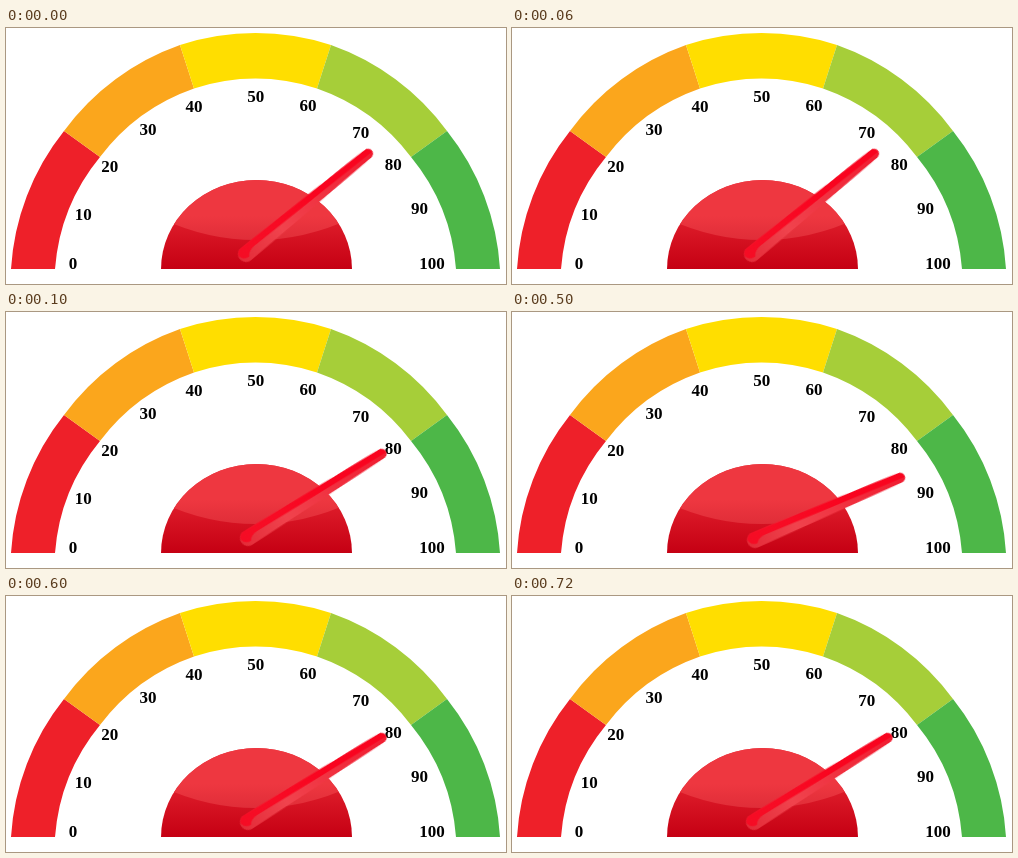
Recreate the animation shown at these times as an HTML page. Size 500 by 256 pixels, loop 800 ms.

```html
<!DOCTYPE html>
<html lang="en">
<head>
<meta charset="utf-8">
<title>Gauge</title>
<style>
html, body { margin: 0; width: 100%; height: 100%; overflow: hidden; background: #fff; }
svg { display: block; width: 500px; height: 256px; }
text { font: bold 17px "Liberation Serif", serif; text-anchor: middle; fill: #000; }
.needle { animation: swing 800ms step-end infinite; }
@keyframes swing {
  0%, 100% { transform: translate(240px, 226px) rotate(-39.4deg); }
  12.5%, 75% { transform: translate(242px, 226px) rotate(-32.2deg); }
  62.5% { transform: translate(243px, 228px) rotate(-23.2deg); }
}
</style>
</head>
<body>
<svg viewBox="0 0 500 256">
  <defs>
    <linearGradient id="body" x2="0" y2="1">
      <stop offset="0" stop-color="#e9303a"/>
      <stop offset=".5" stop-color="#dc1a28"/>
      <stop offset="1" stop-color="#c50013"/>
    </linearGradient>
    <linearGradient id="gloss" x2="0" y2="1">
      <stop offset=".6" stop-color="#ee3740"/>
      <stop offset="1" stop-color="#e02d38"/>
    </linearGradient>
    <linearGradient id="sheen">
      <stop offset="0" stop-color="#e32b38"/>
      <stop offset=".3" stop-color="#f0434d"/>
      <stop offset="1" stop-color="#f01c30"/>
    </linearGradient>
    <linearGradient id="edge">
      <stop offset="0" stop-color="#f9041f" stop-opacity=".8"/>
      <stop offset=".6" stop-color="#f9041f"/>
    </linearGradient>
    <clipPath id="hub"><path d="M155 241A95.5 89 0 0 1 346 241Z"/></clipPath>
  </defs>

  <g id="bands"></g>
  <g id="labels"></g>

  <g clip-path="url(#hub)">
    <rect x="155" y="152" width="191" height="89" fill="url(#body)"/>
    <path d="M150 152H350V188Q301 212 250 212T150 188Z" fill="url(#gloss)"/>
  </g>

  <g class="needle">
    <path d="M0 -8L158 -5A5 5 0 0 1 158 5L0 8A8 8 0 0 1 0 -8Z" fill="url(#sheen)"/>
    <path d="M-7 -3Q-5 -8 0 -8L158 -5A5 5 0 0 1 162 1L12 -1Q4 -1 1 4Q-6 4 -7 -3Z" fill="url(#edge)"/>
  </g>
</svg>
<script>
const add = (id, markup) => document.getElementById(id).insertAdjacentHTML("beforeend", markup);

// Corners of the left half; the right half mirrors them
const mirror = half => [...half, ...half.map(([x, y]) => [499 - x, y]).reverse()];
const outer = mirror([[5, 241], [58, 103], [174, 17]]);
const inner = mirror([[49, 241], [94, 129], [188, 60.5]]);
["#ee2029", "#fba61c", "#ffde00", "#a6ce39", "#4db748"].forEach((color, i) =>
  add("bands", `<path fill="${color}" d="M${outer[i]}A244.5 244.5 0 0 1 ${outer[i + 1]}L${inner[i + 1]}A200 200 0 0 0 ${inner[i]}Z"/>`));

// Labels sit on one circle, unevenly spaced (degrees from the left)
[4, 20, 37.5, 54.5, 71, 91, 108, 127, 141.5, 158, 176].forEach((deg, i) => {
  const a = deg * Math.PI / 180;
  add("labels", `<text x="${246.5 - 180 * Math.cos(a)}" y="${253.7 - 180 * Math.sin(a)}">${i * 10}</text>`);
});
</script>
</body>
</html>
```
